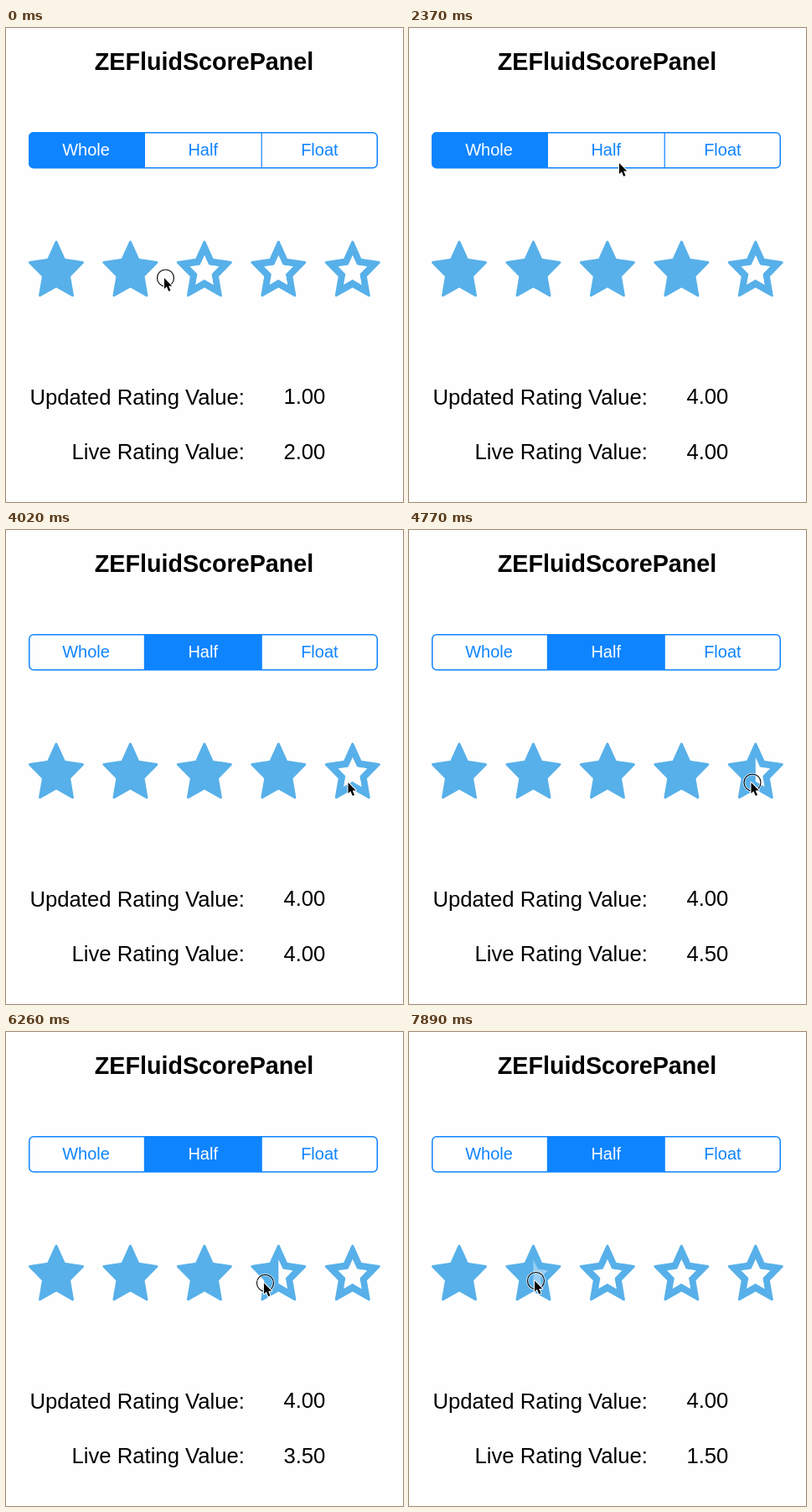
These frames come from a looping animation (474x565 px, 8 s). An HTML page:

```html
<!DOCTYPE html>
<html lang="en">
<head>
<meta charset="utf-8">
<title>Star rating demo</title>
<style>
  html, body { margin: 0; width: 100%; height: 100%; overflow: hidden; background: #fefefe; }
  svg { display: block; width: 474px; height: 565px; }
  text { font: 25.7px "Liberation Sans", Arial, sans-serif; }
  .title { font-size: 28.7px; font-weight: bold; text-anchor: middle; }
  .label { text-anchor: end; }
  .segment { font-size: 20px; text-anchor: middle; }
  .frame { fill: none; stroke: #0f84ff; stroke-width: 1.5; }
  .divider { stroke: #0f84ff; stroke-width: 1.2; }
  .star { fill: #57b0e9; stroke: #57b0e9; stroke-width: 3; stroke-linejoin: round; }
  .hollow { fill: #fefefe; }
  .arrow { stroke: #fff; stroke-width: 2; stroke-linejoin: round; paint-order: stroke; }
</style>
</head>
<body>
<svg viewBox="0 0 474 565">
  <clipPath id="pill"><rect x="27" y="124" width="417" height="43" rx="6"/></clipPath>
  <text class="title" x="236.5" y="49.7">ZEFluidScorePanel</text>

  <rect id="selected" y="124" height="43" width="139.8" fill="#0f84ff" clip-path="url(#pill)"/>
  <rect class="frame" x="27.75" y="124.75" width="415.5" height="42" rx="5.25"/>
  <path class="divider" d="M165.4 124V167M305.2 124V167"/>
  <text class="segment" x="95.6" y="152.2">Whole</text>
  <text class="segment" x="235.2" y="152.2">Half</text>
  <text class="segment" x="374.4" y="152.2">Float</text>

  <g id="stars"></g>

  <text class="label" x="285" y="449.2">Updated Rating Value:</text>
  <text class="label" x="285" y="513.9">Live Rating Value:</text>
  <text id="updated" x="331.4" y="448"></text>
  <text id="live" x="331.4" y="513.9"></text>

  <g id="pointer">
    <g id="ring" fill="none">
      <circle r="10" stroke="#fff" stroke-opacity=".6" stroke-width="3"/>
      <circle r="10" stroke="#000" stroke-width="1.1"/>
    </g>
    <path class="arrow" d="M-1.5 0v13l2.9-2.8 2.3 5.6 2.3-.9-2.3-5.4h4z"/>
  </g>
</svg>
<script>
const LOOP = 8000, TICK = 149.3, TICK_OFFSET = 25;
const STAR_COUNT = 5, STAR_LEFT = 27, STAR_WIDTH = 66, STAR_STEP = 88.45;
const RELEASE = 13, SELECT_HALF = 22, PRESS_AGAIN = 30;

// The pointer rests between these moves; ticks are counted from the start of the loop.
const START = { x: 190.5, y: 298 };
const MOVES = [
  { from: 0, to: 8, x: 327, y: 297, power: 1.5 },
  { from: 12, to: 16, x: 252.5, y: 161, power: 1 },
  { from: 23, to: 27, x: 410, y: 301, power: 1 },
  { from: 35, to: 53, x: 151.5, y: 296.5, power: 1 }
];

const $ = id => document.getElementById(id);
const clamp = value => Math.min(1, Math.max(0, value));

function pointerAt(tick) {
  return MOVES.reduce((point, { from, to, x, y, power }) => {
    const eased = 1 - (1 - clamp((tick - from) / (to - from))) ** power;
    return { x: point.x + (x - point.x) * eased, y: point.y + (y - point.y) * eased };
  }, START);
}

function starPoints(scale, count) {
  return Array.from({ length: count }, (_, i) => {
    const angle = i * Math.PI / 5, [rx, ry] = i % 2 ? [16.3, 17.3] : [33.1, 35.2];
    return `${scale * rx * Math.sin(angle)},${-scale * ry * Math.cos(angle)}`;
  }).join(" ");
}

// Each star is solid, with a hollow that can cover all of it or its right half.
$("stars").innerHTML = Array.from({ length: STAR_COUNT }, (_, i) => `
  <g transform="translate(${60 + i * STAR_STEP} 290.3)">
    <polygon class="star" points="${starPoints(1, 10)}"/>
    <polygon class="hollow" points="${starPoints(.55, 10)}"/>
    <polygon class="hollow" points="${starPoints(.55, 6)}"/>
  </g>`).join("");

function ratingAt(tick) {
  const half = tick >= PRESS_AGAIN;
  const x = pointerAt(half ? tick : Math.min(tick, RELEASE - 1)).x - STAR_LEFT;
  const index = Math.floor(x / STAR_STEP);
  if (!half) return index + 1;
  const part = (x - index * STAR_STEP) / STAR_WIDTH;
  return index + (part > .75 ? 1 : part > .25 ? .5 : 0);
}

// The stars follow the live value one tick late.
function hollowOpacity(before, now, limit) {
  return before <= limit ? 1 : now <= limit ? .4 : 0;
}

function draw(time) {
  const tick = Math.floor((time + TICK_OFFSET) / TICK);
  const now = ratingAt(tick), before = ratingAt(Math.max(0, tick - 1));

  [...$("stars").children].forEach((star, i) => {
    star.children[1].style.opacity = hollowOpacity(before, now, i);
    star.children[2].style.opacity = hollowOpacity(before, now, i + .5);
  });
  $("live").textContent = now.toFixed(2);
  $("updated").textContent = tick < RELEASE ? "1.00" : "4.00";

  const selected = tick < SELECT_HALF ? 0 : 1;
  $("selected").setAttribute("x", 26.2 + 139 * selected);
  document.querySelectorAll(".segment").forEach((text, i) =>
    text.setAttribute("fill", i === selected ? "#fff" : "#0f84ff"));

  const pressed = tick < RELEASE || tick === SELECT_HALF || tick >= PRESS_AGAIN;
  $("ring").style.display = pressed ? "" : "none";
  const { x, y } = pointerAt(tick);
  $("pointer").setAttribute("transform", `translate(${x} ${y})`);
}

const start = performance.now();
function loop() {
  draw((performance.now() - start) % LOOP);
  requestAnimationFrame(loop);
}
loop();
</script>
</body>
</html>
```
